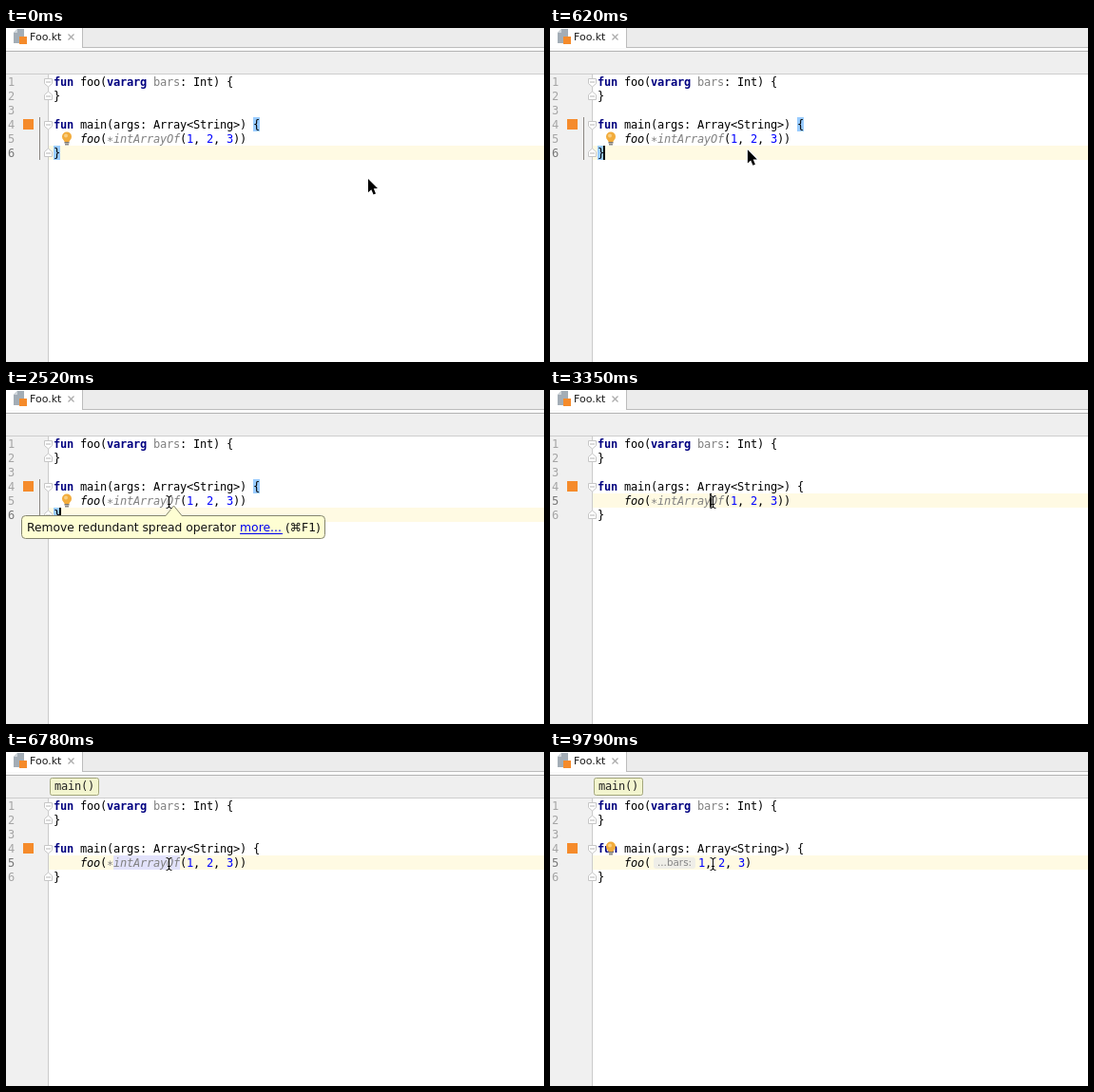
Write an HTML page with a canvas that moves like this. It is 566 px wide and 352 px high and loops after 9820 ms.

```html
<!DOCTYPE html>
<html lang="en">
<head>
<meta charset="utf-8">
<title>Editor</title>
<style>
html, body { margin: 0; width: 100%; height: 100%; overflow: hidden; background: #fff; }
canvas { display: block; width: 566px; height: 352px; }
</style>
</head>
<body>
<canvas id="stage"></canvas>
<script>
const W = 566, H = 352, LOOP = 9820;
const canvas = document.getElementById('stage');
const ratio = window.devicePixelRatio || 1;
canvas.width = W * ratio;
canvas.height = H * ratio;
const c = canvas.getContext('2d');

const MONO = '"DejaVu Sans Mono", monospace';
const SANS = '"DejaVu Sans", sans-serif';
const PITCH = 7, LINE = 15, LEFT = 50;
const ACCENT = '#f58b2b';
const STYLE = {
  plain: ['', '#000'], key: ['bold ', '#000080'], dim: ['', '#808080'],
  call: ['italic ', '#000'], dimCall: ['italic ', '#808080'], num: ['', '#0000ff']
};

const within = (t, a, b) => t >= a && t < b;
const ramp = (t, a, b) => Math.min(1, Math.max(0, (t - a) / (b - a)));
const smooth = u => u * u * (3 - 2 * u);
const lineTop = n => 49 + LINE * (n - 1);
const colX = n => LEFT + PITCH * n;

function rect(x, y, w, h, fill) {
  c.fillStyle = fill;
  c.fillRect(x, y, w, h);
}

function poly(points, fill, stroke, width = 1) {
  c.beginPath();
  points.forEach(([x, y]) => c.lineTo(x, y));
  c.closePath();
  if (fill) { c.fillStyle = fill; c.fill(); }
  if (stroke) { c.strokeStyle = stroke; c.lineWidth = width; c.stroke(); }
}

function stroke(points, color, width = 1) {
  c.beginPath();
  points.forEach(([x, y], i) => i ? c.lineTo(x, y) : c.moveTo(x, y));
  c.strokeStyle = color;
  c.lineWidth = width;
  c.stroke();
}

function round(x, y, w, h, r, fill, edge) {
  c.beginPath();
  c.roundRect(x, y, w, h, r);
  c.fillStyle = fill;
  c.fill();
  if (edge) { c.strokeStyle = edge; c.lineWidth = 1; c.stroke(); }
}

function label(text, x, y, size, color) {
  c.font = size + 'px ' + SANS;
  c.fillStyle = color;
  c.fillText(text, x, y);
}

// Monospaced text on the fixed column grid; returns the end position.
function mono(text, x, y, style = 'plain', color) {
  c.font = STYLE[style][0] + '12px ' + MONO;
  c.fillStyle = color || STYLE[style][1];
  for (const ch of text) {
    c.fillText(ch, x, y);
    x += PITCH;
  }
  return x;
}

function row(n, x, ...parts) {
  for (const [text, style] of parts) x = mono(text, x, lineTop(n) + 12, style);
}

function fold(n, end) {
  const y = lineTop(n) + 8, s = end ? -1 : 1;
  poly([[40.5, y - 3.5 * s], [48.5, y - 3.5 * s], [48.5, y + 1.5 * s],
        [44.5, y + 5 * s], [40.5, y + 1.5 * s]], '#fff', '#c6c6c6');
  rect(42, y - 0.5, 5, 1, '#b4b4b4');
}

function bulb(x, y) {
  c.beginPath();
  c.arc(x, y - 2, 5, 0.75 * Math.PI, 0.25 * Math.PI);
  c.lineTo(x + 2.3, y + 3.5);
  c.lineTo(x - 2.3, y + 3.5);
  c.closePath();
  c.fillStyle = '#f2ac3c';
  c.fill();
  c.beginPath();
  c.arc(x - 1, y - 3, 2, 0, 7);
  c.fillStyle = '#f9cf83';
  c.fill();
  rect(x - 2.5, y + 3.5, 5, 1.5, '#77726a');
  rect(x - 2, y + 5.5, 4, 1.5, '#8d8981');
}

function pencil(x, y) {
  for (let i = 0; i < 4; i++) rect(x - 6, y - 5 + i * 3, 9 - (i % 2) * 2, 1, '#9a9a9a');
  stroke([[x - 3, y + 4], [x + 4.5, y - 3.5]], '#3f8b45', 4);
  stroke([[x - 2.5, y + 2.8], [x + 3.8, y - 3.5]], '#7cc27f', 1.2);
  poly([[x - 5.5, y + 6], [x - 4.5, y + 2.5], [x - 1.8, y + 5.2]], '#4c4c4c');
}

function frame(crumb) {
  rect(0, 0, W, H, '#fff');
  rect(0, 0, W, 21, '#ececec');
  rect(0, 0, 80, 21, '#fff');
  rect(80, 0, 1, 21, '#bcbcbc');
  rect(80, 20, W - 80, 1, '#bcbcbc');
  rect(0, 21, W, 3, '#fafafa');
  rect(0, 24, W, 1, '#b4b4b4');
  rect(0, 25, W, 23, '#efefef');
  rect(0, 48, W, 1, '#cdcdcd');
  rect(0, 49, 44, H - 49, '#f0f0f0');
  rect(44, 49, 1, H - 49, '#cbcbcb');

  poly([[12, 1], [19, 1], [19, 16], [8, 16], [8, 5]], '#a3adb6');
  poly([[8, 5], [12, 5], [12, 1]], '#cfd5da');
  rect(14, 9, 8, 8, ACCENT);
  label('Foo.kt', 25, 13, 11, '#1c1c1c');
  stroke([[65.5, 6.5], [71.5, 12.5]], '#ababab', 1.2);
  stroke([[71.5, 6.5], [65.5, 12.5]], '#ababab', 1.2);

  if (crumb) {
    round(46.5, 27.5, 51, 18, 2, '#f3f5cf', '#a3a67c');
    mono('main()', 51, 40, 'plain', '#222');
  }
}

function code(t) {
  const clicked = t >= 3350, edited = t >= 6810;
  const current = clicked ? 5 : 6;
  rect(45, lineTop(current), W - 45, LINE, '#fffae3');

  for (let n = 1; n <= 6; n++)
    mono(String(n), 2, lineTop(n) + 12, 'plain', n === current ? '#777' : '#a5a5a5');
  rect(18, 96, 11, 11, ACCENT);

  if (!clicked) {
    rect(35, lineTop(4), 1, 45, '#8b8782');
    rect(colX(30), lineTop(4), PITCH, LINE, '#99ccff');
    rect(colX(0), lineTop(6), PITCH, LINE, '#99ccff');
  }
  if (within(t, 3530, 6810)) rect(colX(9), lineTop(5), 70, LINE, '#e2e2fb');

  fold(1, false);
  fold(2, true);
  fold(4, false);
  fold(6, true);

  row(1, LEFT, ['fun', 'key'], [' foo(', 'plain'], ['vararg', 'key'],
    [' ', 'plain'], ['bars', 'dim'], [': Int) {', 'plain']);
  row(2, LEFT, ['}', 'plain']);
  row(4, LEFT, ['fun', 'key'], [' main(args: Array<String>) {', 'plain']);
  row(5, colX(4), ['foo', 'call'], ['(', 'plain']);
  row(6, LEFT, ['}', 'plain']);

  let x = colX(8);
  if (edited) {
    const grow = t < 7140 ? 0 : t < 7180 ? 17 : t < 7220 ? 34 : 50;
    if (grow) hint(x, grow);
    x += grow;
  } else {
    row(5, x, ['∗', 'dim'], ['intArrayOf', 'dimCall'], ['(', 'plain']);
    x = colX(20);
  }
  row(5, x, ['1', 'num'], [', ', 'plain'], ['2', 'num'], [', ', 'plain'],
    ['3', 'num'], [edited ? ')' : '))', 'plain']);
}

function hint(x, width) {
  c.save();
  c.beginPath();
  c.rect(x, lineTop(5), width - 2, LINE);
  c.clip();
  round(x + 3, 111, width - 6, 12, 3, '#efeee8');
  label('...bars:', x + 7, 120, 10.4, '#858585');
  c.restore();
}

function caret(t) {
  const spots = [
    [1, 6, [[530, 1030], [1530, 2040], [2520, 3020]]],
    [17, 5, [[3350, 3620]]],
    [8, 5, [[6810, 7790], [8300, 8780], [9310, 9790]]]
  ];
  for (const [col, n, spans] of spots)
    if (spans.some(([a, b]) => within(t, a, b)))
      rect(colX(col) - 1, lineTop(n), 2, LINE, '#000');
}

function tooltip(alpha) {
  c.save();
  c.globalAlpha = alpha;
  round(16.5, 132.5, 319, 24, 4, '#fefed3', '#84846f');
  poly([[168, 133.5], [168, 132.5], [176.5, 122], [185, 132.5], [185, 133.5]], '#fefed3');
  stroke([[168, 132.5], [176.5, 122], [185, 132.5]], '#84846f');
  label('Remove redundant spread operator', 22, 149, 12.3, '#111');
  label('more...', 246, 149, 12.4, '#0000ee');
  rect(246, 151, 45, 1, '#0000ee');
  label('(⌘F1)', 294, 149, 12.3, '#111');
  c.restore();
}

function menu(alpha) {
  c.save();
  c.globalAlpha = alpha;
  c.shadowColor = 'rgba(0,0,0,.33)';
  c.shadowBlur = 9 * ratio;
  c.shadowOffsetY = 3 * ratio;
  round(169, 124, 269, 74, 2, '#fff');
  c.shadowColor = 'transparent';
  c.strokeStyle = '#c4c4c4';
  c.lineWidth = 1;
  c.strokeRect(168.5, 123.5, 270, 75);
  rect(174, 129, 259, 19, '#0a50d0');
  rect(174, 151, 259, 1, '#d4d4d4');
  bulb(184, 138);
  pencil(184, 164);
  pencil(184, 183);
  const items = [
    ['Remove redundant spread operator', 139, '#fff', '#fff'],
    ['Convert to expression body', 164, '#222', '#8f8f8f'],
    ["Add 'bars =' to argument", 183, '#222', '#8f8f8f']
  ];
  for (const [text, y, ink, arrow] of items) {
    label(text, 196, y + 4, 12.4, ink);
    if (arrow) poly([[422, y - 4], [428, y - 0.5], [422, y + 3]], arrow);
  }
  c.restore();
}

function arrowPointer(x, y) {
  const shape = [[0, 0], [0, 14.2], [3.3, 11.2], [5.6, 16.4], [8, 15.4],
    [5.8, 10.3], [10, 10.1]].map(([a, b]) => [x + a, y + b]);
  c.lineJoin = 'round';
  poly(shape, '#000', '#fff', 2);
  poly(shape, '#000');
  c.lineJoin = 'miter';
}

function beamPointer(x, y) {
  const marks = (color, width) => {
    stroke([[x, y - 5], [x, y + 5]], color, width);
    for (const s of [-1, 1])
      stroke([[x - 3, y + 6.5 * s], [x - 1.5, y + 6.3 * s], [x, y + 5 * s],
              [x + 1.5, y + 6.3 * s], [x + 3, y + 6.5 * s]], color, width);
    stroke([[x - 1.5, y + 2.5], [x + 1.5, y + 2.5]], color, width);
  };
  marks('rgba(255,255,255,.6)', 2.4);
  marks('#111', 1.1);
}

function pointer(t) {
  if (t >= 1420) return beamPointer(171.5, 118);
  const p = smooth(ramp(t, 90, 816));
  const x = 381 - 210.5 * p, y = 159 - 40 * Math.pow(p, 1.35);
  if (t < 700) arrowPointer(x, y);
  else beamPointer(x, y);
}

function draw(t) {
  c.setTransform(ratio, 0, 0, ratio, 0, 0);
  frame(t >= 3620);
  code(t);
  caret(t);
  if (t < 3350) bulb(64, 116.5);
  if (within(t, 4190, 4480) || t >= 7700) bulb(64, 101.5);
  if (within(t, 820, 3350)) tooltip(ramp(t, 820, 905));
  if (within(t, 4480, 6780)) menu(t < 4510 ? 0.5 : 1);
  pointer(t);
}

const start = performance.now();
function tick() {
  draw((performance.now() - start) % LOOP);
  requestAnimationFrame(tick);
}
tick();
</script>
</body>
</html>
```
